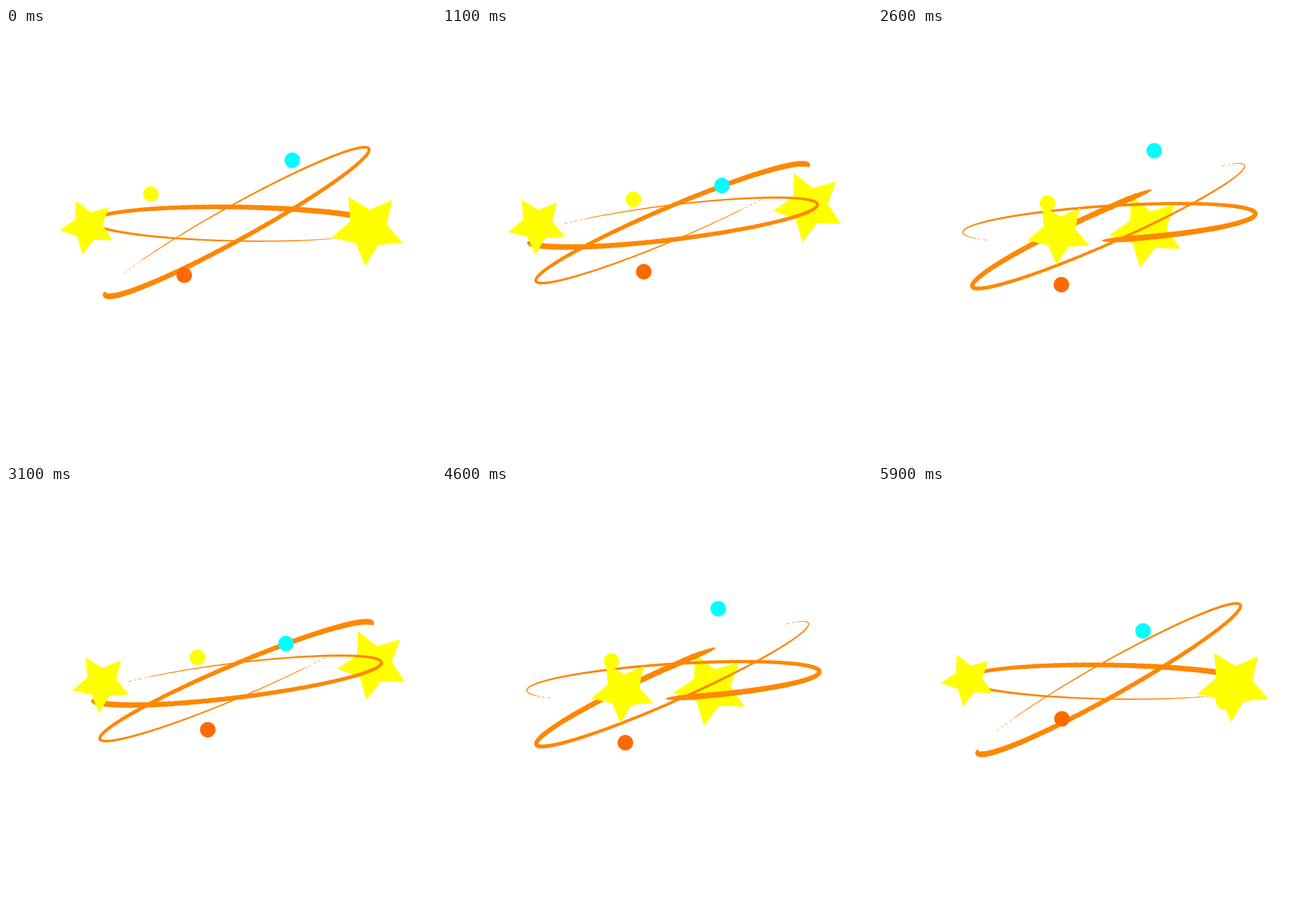
Recreate the animation shown at these times as an HTML page with a canvas. Size 748 by 748 pixels, loop 6.01 s.

```html
<!DOCTYPE html>
<html lang="en">
<head>
<meta charset="utf-8">
<title>Dizzy stars</title>
<style>
  html, body { margin: 0; width: 100%; height: 100%; overflow: hidden; background: #fff; }
  canvas { display: block; width: 748px; height: 748px; }
</style>
</head>
<body>
<canvas id="stage" width="748" height="748"></canvas>
<script>
const ctx = document.getElementById('stage').getContext('2d');
const LOOP = 6010, STEP = 100, CYCLE = 20;
const YELLOW = '#ffff00', CYAN = '#00ffff', RED = '#ff6a00', ORANGE = '#ff8700';
const TAU = Math.PI * 2, RAD = Math.PI / 180;

const mix = (a, b, t) => a + (b - a) * t;
const smooth = t => { t = Math.max(0, Math.min(1, t)); return t * t * (3 - 2 * t); };

// Star orbits: each value is [mean, cosine part, sine part] over one cycle
const starA = { x: [396, -253.4, -6.5], y: [331.5, 14, 26], r: [57.7, -8.1, 6.5], turn: -115 };
const starB = { x: [391.5, 238.2, -3.2], y: [347.5, 1.6, 9.7], r: [58.5, 6.8, 0], turn: -121.7 };

// Tapered strokes along an ellipse, swinging between two poses
const ribbons = [
  { from: { cx: 402, cy: 337, a: 262, b: 29.5, tilt: -29, head: 188, span: 333 },
    to: { cx: 400, cy: 341.5, a: 257, b: 28.5, tilt: -22.6, head: 365, span: 315 }, sway: 5 },
  { from: { cx: 405, cy: 341, a: 255, b: 29.5, tilt: 1, head: -20, span: 300 },
    to: { cx: 400, cy: 338, a: 255, b: 30, tilt: -7, head: 174, span: 311 }, sway: 0 }
];

// Dots drift through a few points: [pose, x, y]
const dots = [
  { color: YELLOW, period: 20, keys: [[0, 252, 289], [1, 257, 311], [11, 333, 298], [19, 601, 375]] },
  { color: CYAN, period: 10, keys: [[0, 498, 230], [1, 487, 274], [3, 500, 175], [9, 461, 252]] },
  { color: RED, period: 10, keys: [[0, 310, 430], [1, 351, 424], [3, 318, 488], [9, 320, 405]] }
];

function fillShape(pts, color) {
  ctx.fillStyle = color;
  ctx.beginPath();
  pts.forEach(p => ctx.lineTo(...p));
  ctx.closePath();
  ctx.fill();
}

function drawStar({ x, y, r, turn }, pose) {
  const angle = pose / CYCLE * TAU;
  const [cx, cy, size] = [x, y, r].map(([m, c, s]) => m + c * Math.cos(angle) + s * Math.sin(angle));
  const pts = Array.from({ length: 10 }, (_, i) => {
    const a = (turn + i * 36) * RAD, d = i % 2 ? size * 0.51 : size;
    return [cx + d * Math.cos(a), cy + d * Math.sin(a)];
  });
  fillShape(pts, YELLOW);
}

function drawDot({ color, period, keys }, pose) {
  const p = pose % period;
  const next = keys.findIndex(k => k[0] > p);
  const b = keys[next < 0 ? keys.length - 1 : next], a = keys[next < 0 ? keys.length - 1 : next - 1];
  const t = a === b ? 0 : (p - a[0]) / (b[0] - a[0]);
  ctx.fillStyle = color;
  ctx.beginPath();
  ctx.arc(mix(a[1], b[1], t), mix(a[2], b[2], t), 13.5, 0, TAU);
  ctx.fill();
}

function drawRibbon({ from, to, sway }, pose) {
  // Two eased half turns with a short rest after each
  const turns = smooth((pose - 1) / 9) + smooth((pose - 12) / 7);
  const f = turns > 1 ? 2 - turns : turns;
  const at = key => mix(from[key], to[key], f);
  const wave = sway * Math.sin(pose / CYCLE * TAU);
  const cx = at('cx'), cy = at('cy') + wave, a = at('a'), b = at('b'), span = at('span');
  const tilt = (at('tilt') + wave * 0.26) * RAD, co = Math.cos(tilt), si = Math.sin(tilt);
  const head = from.head + 180 * turns + (to.head - from.head - 180) * f;

  const point = t => {
    const q = (head - span * t) * RAD, u = a * Math.cos(q), v = b * Math.sin(q);
    return [cx + u * co - v * si, cy + u * si + v * co];
  };

  const STEPS = 300, SOLID = 0.96, left = [], right = [];
  for (let i = 0; i <= STEPS; i++) {
    const t = i / STEPS * SOLID;
    const [x, y] = point(t), p = point(t - 0.001), n = point(t + 0.001);
    const len = Math.hypot(n[0] - p[0], n[1] - p[1]);
    const nx = (p[1] - n[1]) / len, ny = (n[0] - p[0]) / len;
    const cap = Math.min(1, Math.sqrt(t / 0.03 + 0.05));
    const w = (0.8 + 9.8 * (1 - t)) / 2 * cap;
    const rough = 0.05 * w * Math.sin(i * 2.1);
    left.push([x + nx * (w + rough), y + ny * (w + rough)]);
    right.unshift([x - nx * (w - rough), y - ny * (w - rough)]);
  }
  fillShape(left.concat(right), ORANGE);

  // The tail breaks up into short dashes
  ctx.strokeStyle = ORANGE;
  ctx.lineWidth = 1;
  ctx.setLineDash([6, 3, 4, 5]);
  ctx.beginPath();
  for (let i = 0; i <= 20; i++) ctx.lineTo(...point(mix(SOLID, 1, i / 20)));
  ctx.stroke();
  ctx.setLineDash([]);
}

function draw(pose) {
  ctx.fillStyle = '#fff';
  ctx.fillRect(0, 0, 748, 748);
  const behind = pose > 5 && pose < 16;
  if (behind) drawStar(starA, pose);
  ribbons.forEach(r => drawRibbon(r, pose));
  dots.forEach(d => drawDot(d, pose));
  if (!behind) drawStar(starA, pose);
  drawStar(starB, pose);
}

const start = performance.now();
let shown = -1;
function tick(now) {
  const time = Math.max(0, now - start) % LOOP;
  const pose = Math.min(59, Math.floor(time / STEP)) % CYCLE;
  if (pose !== shown) draw(shown = pose);
  requestAnimationFrame(tick);
}
tick(start);
</script>
</body>
</html>
```
